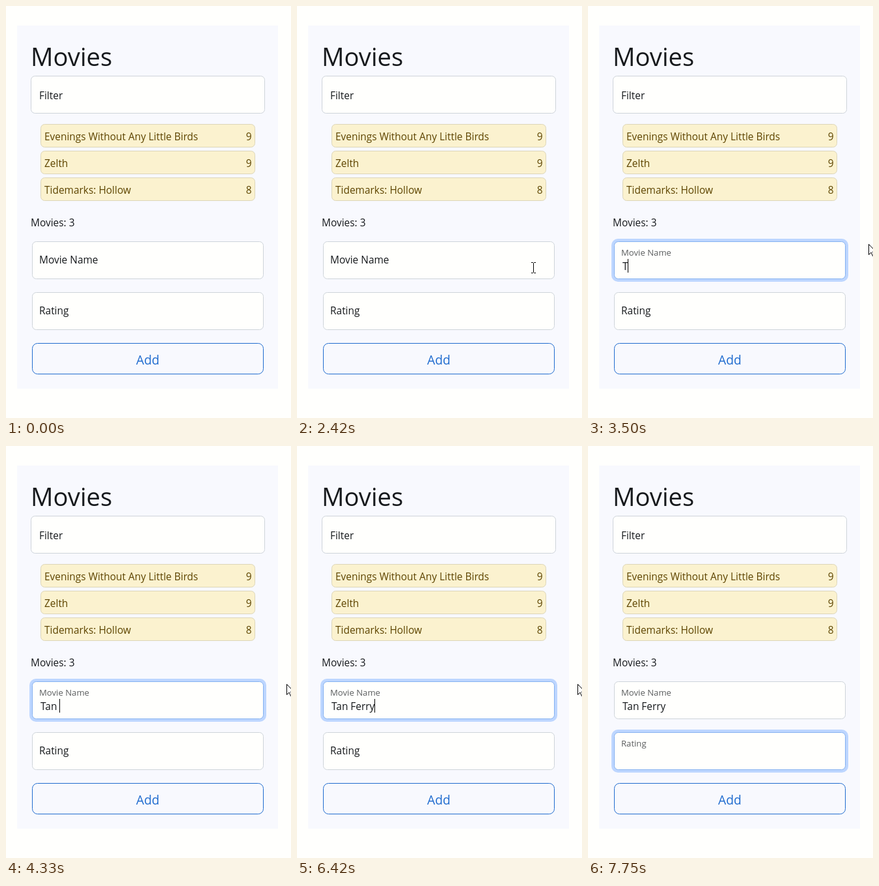
Animation, 438 px wide and 632 px high, one loop 8000 ms. Source, as an HTML page:

```html
<!DOCTYPE html>
<html lang="en">
<head>
<meta charset="utf-8">
<title>Movies</title>
<style>
  html, body { margin: 0; width: 100%; height: 100%; overflow: hidden; background: #fffffd; }
  svg { display: block; }
  text { font: 15.45px "Open Sans", "Noto Sans", sans-serif; fill: #16191c; white-space: pre; }
  .title { font-size: 38.2px; }
  .box { fill: #fffffd; stroke: #ced4da; }
  .item rect { fill: #fbf2cf; stroke: #ddd6b8; }
  .item text { fill: #5e4500; }
  .end { text-anchor: end; }
  .button { fill: none; stroke: #206ccf; }
  .add { font-size: 19.3px; fill: #206ccf; text-anchor: middle; }
  .ring { fill: #0d6efd; }
</style>
</head>
<body>
<svg id="stage" width="438" height="632" viewBox="0 0 438 632">
  <rect x="17" y="30" width="401" height="557" fill="#f8f9fe"/>
  <text class="title" x="38" y="92">Movies</text>
  <rect class="box" x="38.5" y="107.5" width="359" height="57" rx="6"/>
  <text x="51" y="143">Filter</text>
  <g id="list"></g>
  <text x="38" y="338">Movies: 3</text>
  <g id="fields"></g>
  <rect class="button" x="40.5" y="517.5" width="355" height="47" rx="8"/>
  <text class="add" x="218" y="550">Add</text>
  <text id="typed" x="53" y="405"></text>
  <rect id="caret" width="1" height="21"/>
  <path id="arrow" d="M.5 .5V16.5L4.2 13L6.6 18.6L9 17.6L6.6 12H11.6Z" fill="#fff" stroke="#000"/>
  <path id="beam" d="M-3.5 -7.5H-1L0 -6.5L1 -7.5H3.5M0 -6.5V7.5M-3.5 8.5H-1L0 7.5L1 8.5H3.5" fill="none" stroke="#000"/>
</svg>
<script>
const LOOP = 8000, FPS = 12, BLINK = 530, FOCUS_DELAY = 40;
const $ = id => document.getElementById(id);

const movies = [["Evenings Without Any Little Birds", 9], ["Zelth", 9], ["Tidemarks: Hollow", 8]];
$("list").innerHTML = movies.map(([name, rating], i) => `
  <g class="item" transform="translate(53 ${181 + 41 * i})">
    <rect x=".5" y=".5" width="329" height="35" rx="6"/>
    <text x="6" y="25">${name}</text>
    <text class="end" x="324.5" y="25">${rating}</text>
  </g>`).join("");

const fields = [
  { name: "Movie Name", y: 361, focus: 2625, blur: 7215, filled: true },
  { name: "Rating", y: 439, focus: 7215, blur: Infinity }
];
for (const field of fields) {
  const g = document.createElementNS("http://www.w3.org/2000/svg", "g");
  g.innerHTML = `<rect class="ring"/>
    <rect class="box" x="40.5" y="${field.y + .5}" width="355" height="57" rx="6"/>
    <text>${field.name}</text>`;
  [field.ring, field.box, field.label] = g.children;
  $("fields").append(g);
}

const title = "Tan Ferry";
const keyTimes = [3490, 3745, 3990, 4160, 4325, 4660, 4825, 4995, 5333];

// Pointer stops: time, x, y
const pointer = [
  [2250, 428, 209], [2333, 397, 330], [2416, 363, 401], [2583, 344, 400], [2750, 342, 400],
  [2833, 362, 394], [2916, 414, 376], [3000, 431, 365], [6583, 431, 365], [6750, 424, 392],
  [6916, 392, 455], [7083, 355, 488], [7250, 351, 490], [7333, 362, 480], [7416, 412, 444], [7500, 424, 436]
];

const mix = (a, b, p) => a + (b - a) * p;
const ease = (t, duration) => {
  const p = Math.min(1, Math.max(0, t / duration));
  return p * p * (3 - 2 * p);
};
const set = (el, attrs) => {
  for (const key in attrs) el.setAttribute(key, attrs[key]);
};

function drawField({ y, focus, blur, filled, ring, box, label }, t) {
  const since = t - focus - FOCUS_DELAY;
  const sinceBlur = t - blur - FOCUS_DELAY;
  const glow = ease(since, 150) - ease(sinceBlur, 150);
  const lift = ease(since, 100) - (filled ? 0 : ease(sinceBlur, 100));
  const spread = 4 * glow;
  set(ring, {
    x: 40 - spread, y: y - spread, width: 356 + 2 * spread, height: 58 + 2 * spread,
    rx: 6 + spread, opacity: .25 * glow
  });
  box.style.stroke = `rgb(${mix(206, 134, glow)}, ${mix(212, 178, glow)}, ${mix(218, 240, glow)})`;
  set(label, {
    transform: `translate(51 ${y + mix(34, 22, lift)}) scale(${mix(1, .85, lift)})`,
    opacity: mix(1, .7, lift)
  });
}

function drawCaret(t) {
  const typed = $("typed");
  const count = keyTimes.filter(k => k <= t).length;
  typed.textContent = title.slice(0, count);
  const active = fields.find(f => t >= f.focus && t < f.blur);
  if (!active) return set($("caret"), { visibility: "hidden" });
  const last = Math.max(active.focus, ...keyTimes.slice(0, count));
  const shown = Math.floor((t - last) / BLINK) % 2 === 0;
  const width = active.filled && count ? typed.getComputedTextLength() : 0;
  set($("caret"), {
    x: Math.floor(53 + width), y: active.y + 27, visibility: shown ? "visible" : "hidden"
  });
}

function drawPointer(t) {
  const i = pointer.findIndex(stop => stop[0] > t);
  const visible = i > 0;
  let overField = false;
  if (visible) {
    const [t0, x0, y0] = pointer[i - 1], [t1, x1, y1] = pointer[i];
    const p = (t - t0) / (t1 - t0);
    const x = Math.round(mix(x0, x1, p)), y = Math.round(mix(y0, y1, p));
    overField = x > 40 && x < 396 && fields.some(f => y > f.y && y < f.y + 58);
    set($("arrow"), { transform: `translate(${x} ${y})` });
    set($("beam"), { transform: `translate(${x + .5} ${y})` });
  }
  set($("arrow"), { visibility: visible && !overField ? "visible" : "hidden" });
  set($("beam"), { visibility: visible && overField ? "visible" : "hidden" });
}

const start = performance.now();
function draw(now) {
  const elapsed = Math.max(0, now - start) % LOOP;
  // The screen updates twelve times a second
  const t = Math.floor(elapsed * FPS / 1000) * 1000 / FPS;
  fields.forEach(field => drawField(field, t));
  drawCaret(t);
  drawPointer(t);
  requestAnimationFrame(draw);
}
draw(start);
</script>
</body>
</html>
```
